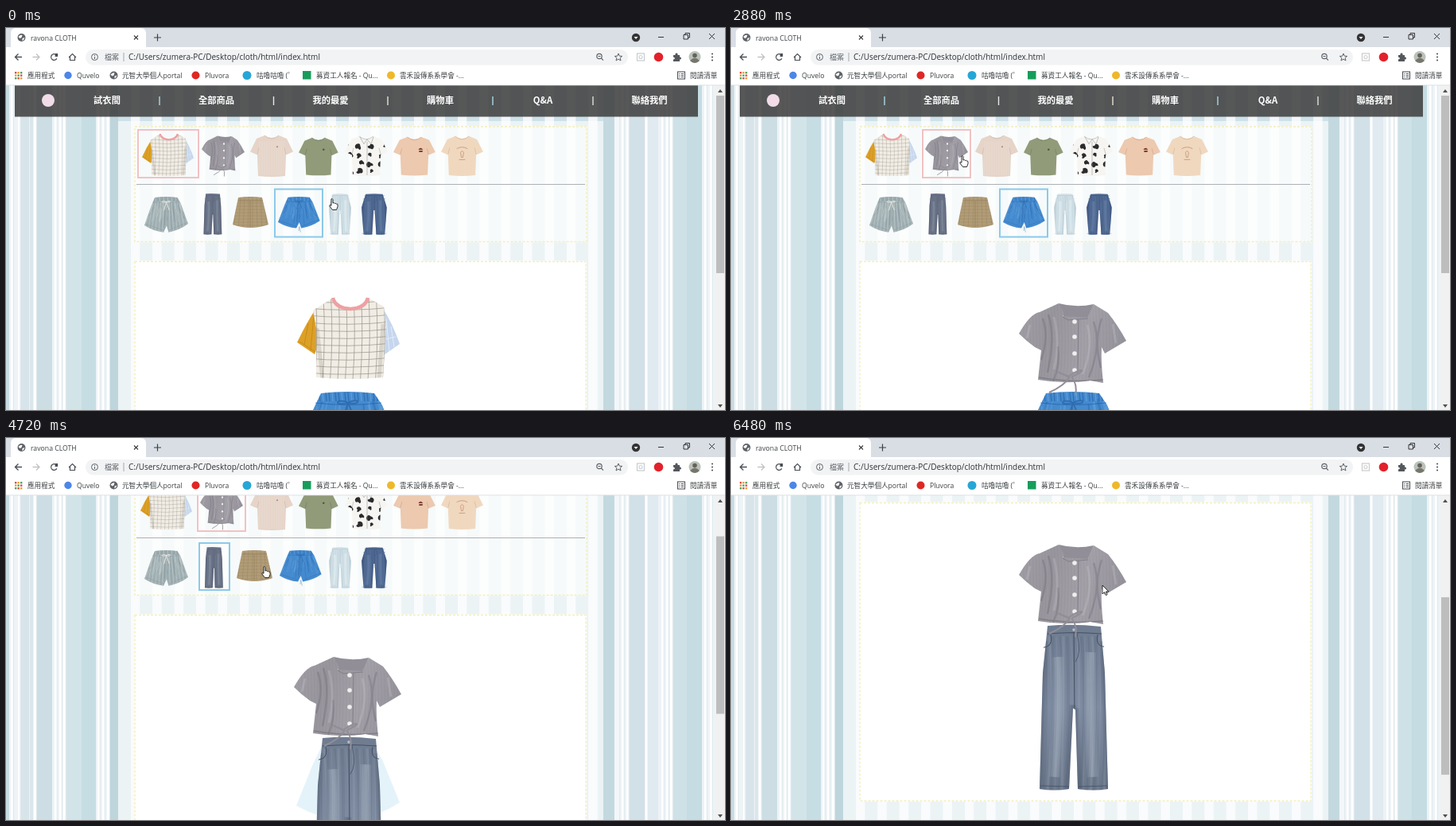
Recreate the animation shown at these times as an HTML page with a canvas. Size 904x480 px, loop 6.64 s.

```html
<!DOCTYPE html>
<html lang="zh-Hant">
<head>
<meta charset="utf-8">
<title>Fitting room</title>
<style>
html, body { margin: 0; width: 100%; height: 100%; overflow: hidden; background: #fff; }
canvas { display: block; }
</style>
</head>
<body>
<canvas id="stage" width="904" height="480"></canvas>
<script>
const g = document.getElementById('stage').getContext('2d');
const LOOP = 6640, STEP = 80, TOP = 72;
const SANS = '"Open Sans", "Noto Sans CJK TC", "Noto Sans CJK", sans-serif';
const CJK = '"Noto Sans CJK TC", "Noto Sans CJK", sans-serif';

// Drawing helpers
const rect = (x, y, w, h, c) => { g.fillStyle = c; g.fillRect(x, y, w, h); };
const fill = (d, c) => { g.fillStyle = c; g.fill(new Path2D(d)); };
const line = (d, c, w = 1) => { g.strokeStyle = c; g.lineWidth = w; g.stroke(new Path2D(d)); };
const frame = (x, y, w, h, c, lw) => { g.strokeStyle = c; g.lineWidth = lw; g.strokeRect(x, y, w, h); };
function disc(x, y, r, c) {
  g.fillStyle = c;
  g.beginPath(); g.arc(x, y, r, 0, Math.PI * 2); g.fill();
}
function ring(x, y, r, c, w = 1.2, from = 0, to = Math.PI * 2) {
  g.strokeStyle = c; g.lineWidth = w;
  g.beginPath(); g.arc(x, y, r, from, to); g.stroke();
}
function pill(x, y, w, h, r, c) {
  g.fillStyle = c;
  g.beginPath(); g.roundRect(x, y, w, h, r); g.fill();
}
function text(s, x, y, size, c = '#3c4043', font = SANS, weight = 400, align = 'left') {
  g.font = `${weight} ${size}px ${font}`;
  g.fillStyle = c; g.textAlign = align;
  g.fillText(s, x, y);
}
function at(x, y, sx, sy, draw) {
  g.save(); g.translate(x, y); g.scale(sx, sy); draw(); g.restore();
}
function inside(d, draw) {
  g.save(); g.clip(new Path2D(d)); draw(); g.restore();
}
function random(seed) {
  return () => (seed = (seed * 16807) % 2147483647) / 2147483647;
}
function blend(x1, y1, ...colors) {
  const b = g.createLinearGradient(0, 0, x1, y1);
  colors.forEach((c, i) => b.addColorStop(i / (colors.length - 1), c));
  return b;
}

// Clothes, each in its own local units
const BODY = 'M45 2Q67 28 89 2L109 13L112 40L108 102Q66 106 24 102L24 40L20 18Z';
function gridShirt() {
  const left = 'M24 15Q12 33 0 58L22 73L27 60Z', right = 'M107 14Q120 34 129 60L109 74L104 40Z';
  fill(left, '#dda027');
  fill(right, '#c5d6ee');
  line('M3 57L23 70M14 34L9 61M21 24L17 68', '#c18616', .8);
  line('M112 28L116 69M118 38L122 64M107 55L124 51', '#e5edf8', 1);
  fill(BODY, '#f1ede5');
  inside(BODY, () => {
    for (let i = 0; i < 12; i++) {
      const x = 14 + i * 9.5;
      line(`M${x} 0Q${x + 3} 50 ${x - 1} 106`, '#96938b', .7);
      line(`M10 ${6 + i * 9}Q65 ${11 + i * 9} 120 ${5 + i * 9}`, '#96938b', .7);
    }
    line('M25 40L32 104M108 35L103 104', 'rgba(120,110,95,.2)', 5);
  });
  line('M45 2Q48 15 67 16Q86 15 89 2', '#efa0a2', 4.5);
}

const BLOUSE = 'M50 1L57 14L55 17L86 19L94 2L112 13Q124 28 135 48L108 64L104 56Q103 75 106 101L90 98Q58 103 24 97L28 60L20 56Q10 49 0 39Q14 14 26 12Z';
function grayTop() {
  fill('M50 1Q72 7 94 2L86 22L57 20Z', '#918e97');
  fill(BLOUSE, blend(135, 30, '#a19ea6', '#98959d', '#a3a0a8', '#96939c'));
  inside(BLOUSE, () => {
    for (let i = 0; i < 34; i++) line(`M${i * 4} 0Q${i * 4 + 5} 55 ${i * 4 - 1} 104`, 'rgba(75,73,85,.08)', .9);
    line('M30 20Q38 43 28 72M37 15Q46 42 36 88M104 20Q94 50 103 82M94 24Q104 54 88 94M49 55Q52 80 43 99', 'rgba(70,67,80,.2)', 2.5);
    line('M44 18Q52 50 44 84M86 28Q94 56 80 90M14 28L10 45M118 27L122 51', 'rgba(215,212,220,.22)', 3);
    line('M25 94Q65 101 106 97', '#807d87', 1.3);
  });
  line('M55 18L62 22L87 20M75 21L74 89', '#7f7c86', .9);
  [24, 43, 64, 85].forEach(y => disc(70, y, 2.8, '#f0eeee'));
  line('M63 93C43 84 47 87 62 93C78 82 89 83 67 93M64 93Q58 104 38 113M66 93Q74 103 71 117', '#918e97', 2);
}

const SHORTS = 'M31 2Q64 -2 98 2L108 17L130 71Q104 88 72 93L66 76L57 93Q26 90 0 75L20 25Z';
function shorts(base, dark, light, striped) {
  fill(SHORTS, base);
  inside(SHORTS, () => {
    const rnd = random(41);
    for (let i = 0; i < 46; i++) {
      const x = 22 + rnd() * 86, y = 8 + rnd() * 28, out = (x - 65) * .35;
      const c = rnd() < .45 ? dark : light;
      g.globalAlpha = .28;
      line(`M${x} ${y}Q${x + out * .2} ${y + 18} ${x + out} ${y + 18 + rnd() * 35}`, c, 1 + rnd() * 2);
    }
    g.globalAlpha = .5;
    for (let x = 25; x < 108; x += 4) line(`M${x} 1L${x + 1} 12`, x % 3 ? dark : light, 1.4);
    if (striped) for (let i = -6; i < 7; i++) line(`M${65 + i * 8} 12L${65 + i * 11} 94`, light, 2);
  });
  g.globalAlpha *= .6;
  line('M24 14Q65 19 107 14M64 15L66 75M2 71L58 88M73 88L128 67', dark, 1);
  g.globalAlpha /= .6;
  line('M64 13C48 8 48 19 64 14C82 6 81 18 65 14L58 36M65 14L74 35', striped ? '#f4eee7' : '#2f6cae', 1.8);
}
const blueShorts = () => {
  shorts('#448acf', '#20589b', '#74afe2');
  line('M66 88L64 101M66 88L70 105', '#7da3c4', 1.5);
};

const STRAIGHT = 'M10 1Q43 -2 77 2L82 60L86 205Q68 208 48 205L45 106L42 104L37 205Q18 208 0 205L4 60Z';
const TAPERED = 'M14 3Q43 -1 72 3L86 70L79 206Q64 208 50 206L45 84L41 84L36 206Q22 208 7 206L0 70Z';
function jeans(cut, base, dark, light) {
  fill(cut, base);
  inside(cut, () => {
    for (let i = 0; i < 20; i++) {
      const x = 3 + i * 4.5;
      g.globalAlpha = .15;
      line(`M${x} 14Q${x + (i % 3) * 4} 95 ${x - 2} 208`, i % 2 ? dark : light, 1 + i % 4);
    }
    // Wide faint strokes fade from seam to the middle of each leg
    for (const w of [14, 9, 4]) {
      g.globalAlpha = .16;
      line('M23 40Q27 90 19 190M64 34Q62 98 67 190', light, w);
      line('M6 20L0 206M80 20L87 206M42 100L37 206M45 104L49 206', dark, w * .7);
    }
  });
  line('M10 11Q43 8 78 11M43 9L44 104M14 12Q17 27 5 28M73 12Q70 26 81 27', dark, 1);
  line('M1 201L37 202M49 202L85 201M47 10Q53 36 45 46', dark, .8);
  disc(43, 6, 1.8, light);
}
const grayJeans = () => jeans(STRAIGHT, blend(0, 206, '#6f7c90', '#7e8ba1', '#6b778a'), '#445063', '#b3bfcf');

const TEE = 'M18 1Q27 7 36 1L46 5L54 21L45 25L44 51Q27 53 10 51L9 25L0 21L8 5Z';
function tee(color, trim, detail) {
  fill(TEE, color);
  line('M18 1Q27 9 36 1M9 24L11 16M45 24L43 16', trim, .7);
  detail();
}
function cowShirt() {
  tee('#f6f5f2', '#b5b3b0', () => {
    const rnd = random(77);
    inside(TEE, () => {
      for (let i = 0; i < 16; i++) {
        const x = (i % 4) * 14 + 3 + rnd() * 6, y = 9 + Math.floor(i / 4) * 12 + rnd() * 6, k = .6 + rnd() * .7;
        at(x, y, k, k, () => { g.rotate(rnd() * 3); fill('M-4 0Q-2 -5 1 -2Q5 -1 4 2Q1 1 0 4Q-4 4 -4 0Z', '#2b2b2d'); });
      }
    });
    line('M19 2L24 11L28 5L33 11L36 2M28 8V51', '#999', .6);
  });
}
function skirt() {
  const d = 'M7 1Q22 -1 37 1L45 35Q22 43 0 35Z';
  fill(d, '#b19c77');
  inside(d, () => {
    for (let i = 0; i < 10; i++) line(`M${i * 5} 0L${i * 6 - 5} 42M0 ${i * 4}H45`, 'rgba(111,88,54,.2)', .8);
  });
  line('M7 5H38M22 5V38', '#94805c', .7);
}

// Page parts
function stripes() {
  rect(0, TOP, 892, 408, '#edf3f6');
  [[0, 4, '#c8dbe2'], [17, 12, '#d7e4e9'], [30, 4, '#dae6eb'], [39, 19, '#ccdde3'], [75, 20, '#d3e4e9'],
   [95, 18, '#c6dde3'], [131, 10, '#bed5dc'], [751, 14, '#c3d9df'], [783, 20, '#d2e0e7'],
   [806, 14, '#e1eaf0'], [838, 18, '#cee1e6'], [856, 19, '#c4dce2']
  ].forEach(([x, w, c]) => rect(x, TOP, w, 408, c));
  for (const x of [6, 15, 35, 61, 67, 72, 115, 121, 127, 768, 774, 780, 804, 824, 830, 835, 878, 885]) {
    rect(x, TOP, 2.5, 408, '#fff');
    rect(x + 3, TOP, 1, 408, '#e1eaee');
  }
  for (let x = 141; x < 751; x += 27.4) {
    rect(x, TOP, 16, 408, '#cfe1e8');
    rect(x + 16, TOP, 11, 408, '#f3f7f9');
  }
  rect(751, TOP, 14, 408, '#c3d9df');
}

function dashedBox(x, y, w, h, color) {
  rect(x, y, w, h, color);
  g.setLineDash([3, 2]);
  frame(x + 1, y + 1, w - 2, h - 2, '#f2efbc', 1.4);
  g.setLineDash([]);
}

function nav() {
  rect(11, 72, 859, 39.5, 'rgba(64,64,64,.87)');
  disc(53, 91, 8, '#f1dce7');
  ['試衣間', '全部商品', '我的最愛', '購物車', 'Q&A', '聯絡我們'].forEach((s, i) =>
    text(s, [127, 264.5, 408, 546, 675, 809][i], 95, 11.3, '#fff', CJK, 700, 'center'));
  [193, 336.5, 480, 612, 738].forEach((x, i) =>
    rect(x - .7, 86, 1.4, 11, ['#a9d8e4', '#e8e8e8', '#ecdfd0', '#a9d8e4', '#ddd'][i]));
}

function wardrobe(s) {
  const shift = s.gray ? -2 : 0;
  at(171 + shift, 132, .504, .52, gridShirt);
  at(246 + shift, 135, .4, .44, grayTop);
  at(307, 134, 1, 1.02, () => tee('#e6d4c8', '#cfbaad', () => {
    for (let x = 12; x < 44; x += 3) line(`M${x} 8V50`, 'rgba(255,255,255,.25)', .6);
    disc(34, 15, 1, '#a77f76');
  }));
  at(368, 137, .92, .93, () => tee('#919b79', '#747f5f', () => disc(34, 17, 1.4, '#4f583e')));
  at(426, 135, 1, .98, cowShirt);
  at(487, 136, .98, .95, () => tee('#ecc9af', '#d2a687', () => fill('M32 18Q35 13 38 18ZM33 19H38L37 21H33Z', '#7f3d32')));
  at(547, 135, .98, .98, () => tee('#f0d8bf', '#d3b496', () => {
    line('M20 17Q27 13 34 17M25 22Q27 18 29 22L28 28H26ZM23 31H31', '#c58f72', .8);
  }));
  rect(164, 196, 564, .9, '#a5a9ad');
  at(174, 212, .423, .48, () => shorts('#9faeb2', '#75868a', '#d1d9d7', true));
  at(s.pants ? 250 : 248.5, 208, .265, .25, () => jeans(STRAIGHT, '#697287', '#464d5e', '#979fb0'));
  at(s.pants ? 290 : 285, 212, 1, 1, skirt);
  at(s.pants ? 344 : 342, 212, .405, .425, blueShorts);
  at(406, 208, .325, .25, () => jeans(TAPERED, '#cfdee5', '#9db3bf', '#edf4f7'));
  at(447, 208, .37, .25, () => jeans(TAPERED, '#4f6992', '#2d4269', '#7890b5'));

  const pink = '#f1c2c4', blue = '#8cc9ea';
  if (s.gray) frame(241, 128, 60, 60, pink, 2); else frame(166, 128, 76, 60, pink, 2);
  if (s.pants) frame(243, 203, 38, 59, blue, 2); else frame(338, 202.5, 60, 60, blue, 2);
}

function page(s) {
  g.save();
  g.beginPath(); g.rect(0, TOP, 892, 408); g.clip();
  stripes();
  g.translate(0, -s.scroll);
  rect(141, 117, 610, 800, 'rgba(255,255,255,.6)');
  nav();
  dashedBox(161, 123, 570, 146.5, 'rgba(255,255,255,.58)');
  wardrobe(s);
  dashedBox(161, 292.5, 569, 376.5, '#fff');
  if (s.ghost) {
    g.globalAlpha = .16;
    at(365, 458, 1, 1, () => fill(SHORTS, '#58b2d8'));
    g.globalAlpha = 1;
  }
  if (s.pants) at(388, 447, 1, 1.005, grayJeans); else at(365, 457, 1, 1, blueShorts);
  if (s.gray) at(362, 345, 1, 1, grayTop); else at(366, 337, 1, 1, gridShirt);
  g.restore();

  rect(892, TOP, 12, 408, '#f1f1f1');
  rect(893, 85 + s.scroll * .543, 10, 223, '#bdbdbd');
  fill('M895 81L898 77L901 81ZM895 473L898 477L901 473Z', '#505050');
}

// Browser window
function globe(x, y) {
  disc(x, y, 5, '#5f6368');
  at(x, y, 1, 1, () => fill('M-4 -1Q-1 -4 1 -3L0 0L-2 1ZM1 1L4 0Q3 3 1 4Z', '#fff'));
}

function browser() {
  rect(0, 0, 904, 24, '#d9dee5');
  pill(6, 0, 170, 30, 6, '#fff');
  rect(0, 24, 904, 48, '#fff');
  globe(19.5, 12);
  text('ravona CLOTH', 31, 15.5, 8.7);
  line('M161 9.5L166 14.5M166 9.5L161 14.5M186 12H195M190.5 7.5V16.5', '#3c4043', 1.2);
  disc(792, 12, 5.2, '#333');
  fill('M789.5 11H794.5L792 14Z', '#fff');
  line('M820 11.5H827M884 7L891 14M891 7L884 14M852 8.5H857.5V14H852ZM854 8.5V6.5H859.5V12H857.5', '#222', .9);

  line('M20 36.5H11.5M15.5 32.5L11.5 36.5L15.5 40.5', '#4b4f54', 1.3);
  line('M33.5 36.5H42M38 32.5L42 36.5L38 40.5', '#c0c3c6', 1.3);
  ring(60.5, 36.5, 3.8, '#4b4f54', 1.3, .5, 5.4);
  fill('M62 32H65.2V36H61.5Z', '#4b4f54');
  line('M79 37L83.5 32.5L88 37M80.5 36V40.5H86.5V36', '#4b4f54', 1.2);
  pill(100, 27, 682, 19.5, 9.7, '#f1f3f4');
  ring(111.5, 36.5, 4, '#5f6368', 1);
  line('M111.5 36V39M111.5 33.8V35', '#5f6368', 1);
  text('檔案', 124, 40, 9, '#5f6368');
  rect(147.5, 31, 1, 11, '#a5a8ac');
  text('C:/Users/zumera-PC/Desktop/cloth/html/index.html', 154, 40.3, 10, '#303236');
  ring(746, 35.5, 3.2, '#5f6368');
  line('M748.4 38L751 40.6M744.5 35.5H747.5', '#5f6368', 1.1);
  line('M770 32L771.3 35.2L774.7 35.4L772.1 37.6L773 41L770 39.1L767 41L767.9 37.6L765.3 35.4L768.7 35.2Z', '#5f6368', 1);
  frame(793.5, 32, 9, 9, '#c8cbce', 1.2);
  ring(798, 36.5, 2, '#d0d2d5');
  disc(820.5, 36.5, 5.8, '#e2212b');
  fill('M839 34H841.5Q841 31.5 843 31.5T844.5 34H847V36.5Q849 36 849 38T847 39.5V42H839V39.5Q841 39 841 38T839 36.5Z', '#54585d');
  disc(866, 36.5, 7.5, '#b9c3b9');
  disc(866, 34.5, 2.8, '#66615b');
  fill('M860 41Q866 34 872 41Q866 47 860 41Z', '#77766d');
  [32.5, 36.5, 40.5].forEach(y => disc(888, y, 1.1, '#54585d'));

  for (let i = 0; i < 9; i++)
    rect(11 + (i % 3) * 3.5, 55 + Math.floor(i / 3) * 3.5, 2.4, 2.4, ['#df5145', '#e7a13a', '#52a564'][(i + Math.floor(i / 3)) % 3]);
  disc(78, 59.5, 4.7, '#4c87e8');
  globe(135.5, 59.5);
  disc(238.5, 59.5, 5, '#df2724');
  disc(303, 59.5, 5.5, '#26a6d6');
  rect(373, 54, 10.5, 10.5, '#179d5b');
  disc(484, 59.5, 5, '#efb829');
  [['應用程式', 27], ['Quvelo', 89], ['元智大學個人portal', 146], ['Pluvora', 250], ['咕嚕咕嚕 (゜', 315],
   ['募資工人報名 - Qu...', 390], ['雲禾設傳系系學會 -...', 495], ['閱讀清單', 860]
  ].forEach(([s, x]) => text(s, x, 62.8, 8.6));
  frame(844.5, 55, 9, 9, '#4f5358', 1.1);
  line('M846 57.5H847.2M848.5 57.5H852M846 59.5H847.2M848.5 59.5H852M846 61.5H847.2M848.5 61.5H852', '#4f5358', .9);
  rect(0, 71.5, 904, .8, '#d6dadd');
}

// Motion: eased travel between [time, value...] stops
function track(t, stops) {
  const i = stops.findIndex(p => p[0] > t);
  if (i === 0) return stops[0].slice(1);
  if (i < 0) return stops[stops.length - 1].slice(1);
  const a = stops[i - 1], b = stops[i], u = (t - a[0]) / (b[0] - a[0]), e = u * u * (3 - 2 * u);
  return a.slice(1).map((v, k) => v + (b[k + 1] - v) * e);
}
const PATH = [[0, 407, 214], [1200, 288, 160], [3360, 288, 160], [3920, 259, 160], [4400, 259, 160],
  [4720, 322, 161], [5200, 460, 173], [5680, 467, 185]];
function easeOut(t, from, to) {
  const u = Math.min(1, Math.max(0, (t - from) / (to - from)));
  return 1 - (1 - u) ** 2;
}

function pointer(t) {
  const [x, y] = track(t, PATH);
  at(x, y, 1, 1, () => {
    const d = t < 4960
      ? 'M2 1Q3.5 0 4 1.5V6Q6 5 6.5 6.6Q8 5.8 8.7 7.2Q10 6.5 10 8.4V10.5L8.5 14.5H3.5L0 10Q-1 7.5 2 9.2Z'
      : 'M0 0V11L2.6 8.7L4.4 12.6L6.1 11.8L4.4 8H7.8Z';
    fill(d, '#fff');
    line(d, '#161616', .9);
  });
}

function draw(t) {
  page({
    scroll: 71 * easeOut(t, 2960, 3120) + 141 * easeOut(t, 5026, 5280),
    gray: t >= 1840,
    pants: t >= 4400,
    ghost: t >= 4400 && t < 4800
  });
  browser();
  pointer(t);
}

function tick() {
  draw(Math.floor((performance.now() % LOOP) / STEP) * STEP);
  requestAnimationFrame(tick);
}
tick();
</script>
</body>
</html>
```
